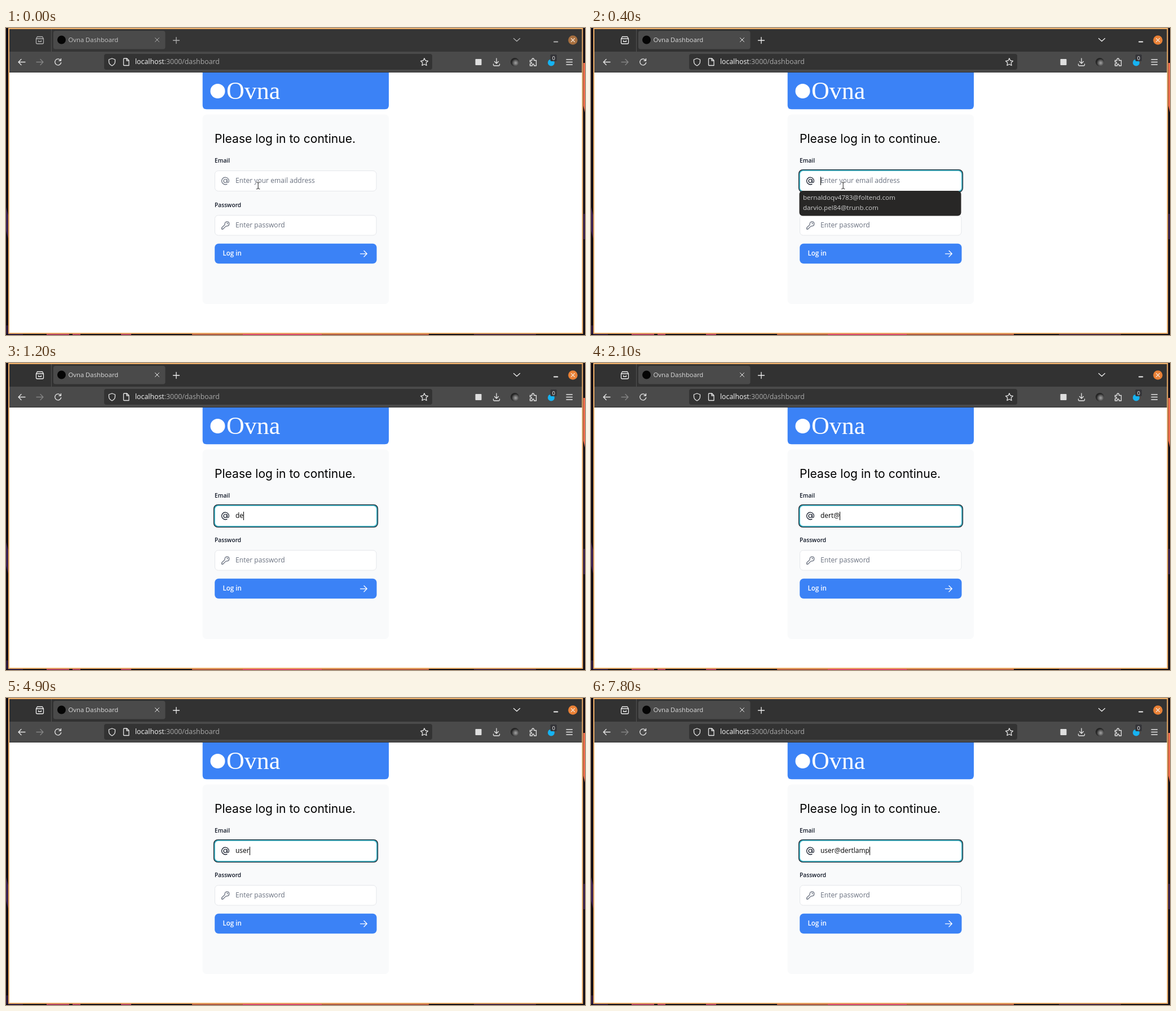
An HTML page for the animation above (8 s loop, 1027 px wide and 545 px high).

```html
<!DOCTYPE html>
<html lang="en">
<head>
<meta charset="utf-8">
<title>Ovna Dashboard</title>
<style>
  html, body { margin: 0; width: 100%; height: 100%; overflow: hidden; background: #120d14; }
  svg { display: block; width: 100%; height: 100%; }
  text { font-family: "Open Sans", "Noto Sans", sans-serif; font-size: 12px; white-space: pre; }
  .line { fill: none; stroke: #e6e6e6; stroke-width: 1.3; stroke-linecap: round; stroke-linejoin: round; }
  .label { font-size: 10.2px; font-weight: 600; fill: #111827; }
  .hint { fill: #6b7280; font-size: 12.1px; }
  .box { fill: #fff; stroke: #e5e7eb; }
  .title { stroke: #f0f0f0; }
  .bar { fill: #323232; }
  .tabname { font-size: 11.3px; fill: #dadada; }
  .close { fill: #ea8136; }
  .at { stroke: #111827; stroke-width: 1.2; }
  .idle .title { stroke: #b0b0b0; }
  .idle .bar { fill: #353535; }
  .idle .tabname { fill: #c4c4c4; }
  .idle .close { fill: #a66f3f; }
  .idle .at { stroke: #6b7280; }
  .idle .ring { display: none; }
</style>
</head>
<body>
<svg id="stage" class="idle" viewBox="0 0 1027 545" preserveAspectRatio="none">
  <!-- desktop behind the window -->
  <rect width="1027" height="545" fill="#120d14"/>
  <path d="M0 318L4 332V374L0 360Z" fill="#3c2350"/>
  <path d="M0 528H4V545H30V543H0Z" fill="#2c1a3c"/>
  <path d="M1024 62H1027V150L1024 138Z" fill="#ee6c4b"/>
  <path d="M1024 330H1027V375H1024Z" fill="#35204a"/>
  <path d="M72 543H112V545H72ZM118 543H132V545H118ZM204 543H222V545H204Z" fill="#a83a5c"/>
  <path d="M330 543H420V545H330ZM560 543H750V545H560Z" fill="#b0573f"/>
  <path d="M420 543H560V545H420Z" fill="#d8476a"/>
  <path d="M830 543H940V545H830Z" fill="#402340"/>

  <!-- window and browser bars -->
  <rect x="5" y="1" width="1017.500" height="541" fill="#fff"/>
  <rect class="bar" x="5" y="1" width="1017" height="41"/>
  <rect x="5" y="42" width="1017" height="37" fill="#4a4a4a"/>
  <rect x="5" y="78" width="1017" height="1" fill="#303030"/>
  <rect x="80" y="2" width="1" height="40" fill="#505050"/>
  <rect x="84" y="5" width="198.500" height="32.500" rx="4" fill="#4a4a4a"/>
  <rect x="174" y="46" width="582" height="28" rx="4" fill="#333"/>
  <rect x="5" y="1" width="1017.500" height="541" fill="none" stroke="#f0b069" stroke-width="2"/>

  <!-- tab strip -->
  <g class="line title">
    <path d="M55.500 15.500H64.500M53.500 19H66.500M53.500 19L55.500 15.500M66.500 19L64.500 15.500M53.500 19V26Q53.500 28 55.500 28H64.500Q66.500 28 66.500 26V19M57.500 22.500V24H62.500V22.500"/>
    <path d="M264.500 17.500L271.500 24.500M271.500 17.500L264.500 24.500" stroke-width="1"/>
    <path d="M296.500 22H307.500M302 16.500V27.500"/>
    <path d="M900.500 18.500L906 23.500L911.500 18.500"/>
    <path d="M972 24.500H978.500" stroke-width="1.800"/>
  </g>
  <circle cx="98.500" cy="21" r="7.500" fill="#050505"/>
  <text class="tabname" x="110.500" y="25">Ovna Dashboard</text>
  <circle class="close" cx="1005.500" cy="21.500" r="8.300"/>
  <path class="line" d="M1002.500 18.500L1008.500 24.500M1008.500 18.500L1002.500 24.500" style="stroke:#f3dfcf"/>

  <!-- toolbar -->
  <g class="line">
    <path d="M34 60.500H22.500M27 55.500L22 60.500L27 65.500"/>
    <path d="M54 60.500H65.500M61 55.500L66 60.500L61 65.500" stroke="#858585"/>
    <path d="M97 57.500A5.500 5.500 0 1 0 97.700 61.500M97.500 54.500V58H94"/>
    <path d="M188 54L193.500 56V59.500Q193.500 64.500 188 67Q182.500 64.500 182.500 59.500V56Z"/>
    <path d="M209.500 54H214.500L218 57.500V66.500H209.500Q208.500 66.500 208.500 65.500V55Q208.500 54 209.500 54M214 54.500V58H217.500"/>
    <path d="M742 53.800L744 58L748.500 58.600L745.200 61.800L746 66.500L742 64.300L738 66.500L738.800 61.800L735.500 58.600L740 58Z"/>
    <path d="M870 54V62.500M866.500 59.500L870 63L873.500 59.500M864.500 64V65.500Q864.500 67 866 67H874Q875.500 67 875.500 65.500V64"/>
    <path d="M929.500 57.500H933V56Q933 54 934.800 54Q936.500 54 936.500 56V57.500H940.500V67H936.500V65.500Q936.500 64 935 64Q933.500 64 933.500 65.500V67H929.500V63.500H931Q932.500 63.500 932.500 62Q932.500 60.500 931 60.500H929.500Z"/>
    <path d="M994 56H1004.500M994 60.500H1004.500M994 65H1004.500"/>
  </g>
  <rect x="832.500" y="55" width="11" height="11" rx="1" fill="#dedede"/>
  <radialGradient id="photo" cx=".6" cy=".6">
    <stop offset="0" stop-color="#a5a5a5"/><stop offset=".55" stop-color="#626262"/><stop offset="1" stop-color="#242424"/>
  </radialGradient>
  <circle cx="902.500" cy="60.500" r="7.500" fill="url(#photo)"/>
  <circle cx="967" cy="61.500" r="6" fill="#16b3f2"/>
  <rect x="965.500" y="47" width="11.500" height="12" rx="2" fill="#343438"/>
  <text x="968.700" y="56.500" fill="#fff" style="font-size:9px">0</text>
  <text x="229" y="64.200" fill="#a9a9a9" style="font-size:12.350px"><tspan fill="#f5f5f5">localhost</tspan>:3000/dashboard</text>

  <!-- page -->
  <path d="M348.700 79H679V137.300Q679 144.300 672 144.300H355.700Q348.700 144.300 348.700 137.300Z" fill="#3b82f6"/>
  <circle cx="375.500" cy="112" r="13" fill="#fff"/>
  <text x="391" y="125.500" fill="#fff" style="font-family:'Liberation Serif',serif;font-size:44px">Ovna</text>
  <rect x="348.700" y="153.500" width="330.300" height="336.500" rx="7" fill="#f9fafb"/>
  <text x="370" y="203.500" style="font-family:Inter,sans-serif;font-size:21.100px">Please log in to continue.</text>
  <text class="label" x="370" y="239.200">Email</text>
  <text class="label" x="370" y="318.200">Password</text>

  <rect class="box" x="370.500" y="253.500" width="286.500" height="36" rx="6"/>
  <g class="ring" fill="none" stroke-width="1.500">
    <rect x="368.700" y="251.700" width="290.600" height="39.600" rx="7" stroke="#14202b"/>
    <rect x="370.100" y="253.100" width="287.800" height="36.800" rx="6" stroke="#27adc1"/>
  </g>
  <g class="line at">
    <circle cx="389" cy="271.500" r="3"/>
    <path d="M392 268.500V272.500Q392.300 274.500 393.900 274.300Q395.500 273.800 395.400 271.500A6.400 6.400 0 1 0 392 277.100"/>
  </g>
  <rect class="box" x="370.500" y="332.500" width="286.500" height="35.500" rx="6"/>
  <path class="line" style="stroke:#6b7280" d="M392.300 343.800Q395.800 343.800 395.800 347.500Q395.800 351.500 391.800 351.700Q390.300 351.600 389.500 352.400L384.800 357H382.700V354.500L387.600 349.800Q388.300 349 388.200 347.500Q388.400 343.900 392.300 343.800M392 346.500Q393.200 346.600 393.300 347.800"/>
  <text class="hint" x="407" y="354">Enter password</text>
  <rect x="370.200" y="382.800" width="287.300" height="35.500" rx="7" fill="#3b82f6"/>
  <text x="384.500" y="404.300" fill="#fff" style="font-size:11.600px;font-weight:600">Log in</text>
  <path class="line" style="stroke:#fff" d="M628.500 400.800H640M635 395.500L640.300 400.800L635 406"/>

  <text class="hint" id="hint" x="407" y="275">Enter your email address</text>
  <text id="typed" x="407" y="275" fill="#000"></text>
  <rect id="caret" y="264" width="1" height="15" fill="#000"/>

  <g id="menu">
    <rect x="369.500" y="289" width="287" height="44.500" rx="6" fill="#282726"/>
    <g fill="#cfcfcf">
      <text x="376" y="305.300" style="font-size:11.600px">bernaldoqv4783@foltend.com</text>
      <text x="376" y="323.300" style="font-size:11.600px">darvio.pel84@trunb.com</text>
    </g>
  </g>
  <g id="mouse" fill="none" stroke-linecap="round">
    <g stroke="#fff" stroke-width="2.600"><use href="#beam"/></g>
    <g stroke="#222"><path id="beam" d="M444.500 273.500Q447.200 273.500 447.200 275.500V284Q447.200 286 444.500 286M450 273.500Q447.200 273.500 447.200 275.500M447.200 284Q447.200 286 450 286"/></g>
  </g>
</svg>
<script>
  const LOOP = 8000;
  // [start ms, text in the field, caret visible]
  const steps = [
    [0, "", 0], [400, "", 1],
    [1100, "d", 1], [1200, "de", 1], [1500, "der", 1], [1800, "dert", 1],
    [2100, "dert@", 1], [2700, "dert@", 0], [3800, "dert", 1], [4000, "dert", 0],
    [4300, "de", 1], [4400, "", 1],
    [4700, "u", 1], [4800, "use", 1], [4900, "user", 1],
    [5200, "user@", 1], [5400, "user@", 0], [5800, "user@d", 1], [5900, "user@de", 1],
    [6100, "user@der", 1], [6300, "user@dert", 1],
    [7000, "user@dertl", 1], [7100, "user@dertla", 1], [7200, "user@dertlam", 1],
    [7800, "user@dertlamp", 1]
  ];
  const el = id => document.getElementById(id);
  const stage = el("stage"), typed = el("typed"), caret = el("caret");
  const show = (id, on) => { el(id).style.display = on ? "" : "none"; };

  function draw(t) {
    const [, text, blink] = steps.findLast(s => s[0] <= t);
    stage.classList.toggle("idle", t < 300);
    typed.textContent = text;
    caret.setAttribute("x", Math.round(407 + (text ? typed.getComputedTextLength() : 0)));
    show("caret", blink);
    show("hint", !text);
    show("menu", t >= 400 && t < 1100);
    show("mouse", t < 1100);
  }

  const start = performance.now();
  function tick() {
    draw((performance.now() - start) % LOOP);
    requestAnimationFrame(tick);
  }
  tick();
</script>
</body>
</html>
```
